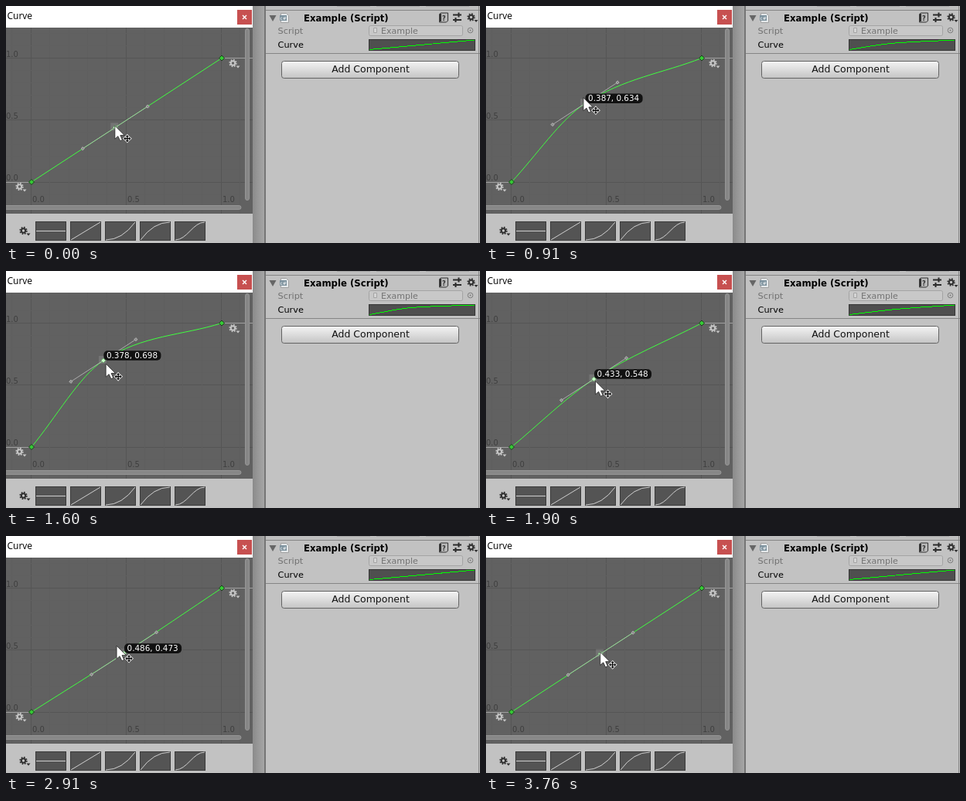
Animation, 613 px wide and 307 px high, one loop 3910 ms. Source, as an HTML page:

```html
<!DOCTYPE html>
<html lang="en">
<head>
<meta charset="utf-8">
<title>Curve editor</title>
<style>
html, body { margin: 0; width: 100%; height: 100%; overflow: hidden; background: #c2c2c2; }
svg { display: block; width: 613px; height: 307px; font: 11px "DejaVu Sans", sans-serif; }
.axis { font-size: 10px; fill: #3f3f3f; }
.line { fill: none; stroke: #40ff40; }
.crisp { shape-rendering: crispEdges; }
</style>
</head>
<body>
<svg viewBox="0 0 613 307">
  <defs>
    <linearGradient id="btn" x2="0" y2="1"><stop stop-color="#f4f4f4"/><stop offset="1" stop-color="#c4c4c4"/></linearGradient>
    <linearGradient id="shade"><stop stop-color="#8b8b8b"/><stop offset="1" stop-color="#a6a6a6"/></linearGradient>
    <g id="gear">
      <circle r="4.3" fill="none" stroke="currentColor" stroke-width="1.8" stroke-dasharray="1.7 1.677"/>
      <circle r="2.7" fill="none" stroke="currentColor" stroke-width="2"/>
      <path d="M4 3.5h5l-2.500 3z" fill="currentColor"/>
    </g>
  </defs>

  <!-- inspector -->
  <rect width="613" height="307" fill="#c2c2c2"/>
  <rect x="319" width="15" height="307" fill="url(#shade)"/>
  <g class="crisp">
    <rect x="334" width="2" height="307" fill="#757575"/>
    <rect x="336" width="277" height="5" fill="#bebebe"/>
    <path d="M428 0.5h43M479 0.5h56M543 0.5h56" stroke="#a5a5a5"/>
    <path d="M336 5.5h277M336 61.5h277" stroke="#858585"/>
    <path d="M611.500 0V307" stroke="#858585"/>
  </g>
  <path d="M340.500 12h9l-4.500 8z" fill="#666"/>
  <path d="M355.500 9.500h7l3 3v9h-10z" fill="#e4e8ea" stroke="#a0a0a0"/>
  <rect x="354" y="12" width="9" height="7" fill="#7d929e"/>
  <text x="354.500" y="18" font-size="6" fill="#fff">c#</text>
  <text x="385" y="20" font-size="11.7" font-weight="bold">Example (Script)</text>
  <path d="M560.500 10.500l2-1.500h9v10l-2 2h-9z" fill="#b8b8b8" stroke="#333"/>
  <path d="M562 10v10" stroke="#333" stroke-width="2"/>
  <text x="564" y="18.500" font-size="8" font-weight="bold" fill="#333">?</text>
  <path d="M578 11.500h11M578 18h11M585.500 8.500v6M581.500 15v6" stroke="#2b2b2b" stroke-width="2"/>
  <use href="#gear" x="601.500" y="14.500" color="#303030"/>
  <text x="351.500" y="36" font-size="11.300" fill="#707070">Script</text>
  <rect x="469.500" y="25.500" width="121" height="13" rx="2" fill="#c8c8c8" stroke="#a4a4a4"/>
  <path d="M475.500 28.500h4v6h-4z" fill="#d4d4d4" stroke="#a4a4a4"/>
  <text x="485" y="36" fill="#737373">Example</text>
  <circle cx="600.500" cy="31.500" r="3.300" fill="none" stroke="#7d7d7d"/>
  <circle cx="600.500" cy="31.500" r="1" fill="#7d7d7d"/>
  <text x="351.500" y="54" font-size="11.300">Curve</text>
  <rect x="469.500" y="43.500" width="137" height="14" fill="#4f4f4f" stroke="#363636"/>
  <path id="mini" class="line crisp" style="stroke: #0f0"/>
  <rect x="356.500" y="71.500" width="229" height="22" rx="3" fill="url(#btn)" stroke="#636363"/>
  <text x="471.500" y="86" font-size="12.500" text-anchor="middle" fill="#111">Add Component</text>

  <!-- curve window -->
  <rect width="319" height="28" fill="#fff"/>
  <text x="1.500" y="17" style="font: 12px 'Open Sans', sans-serif">Curve</text>
  <rect x="299" y="5" width="19" height="19" fill="#c75050"/>
  <path d="M306 12l5 5M311 12l-5 5" stroke="#fff" stroke-width="1.400"/>
  <rect y="28" width="319" height="241" fill="#616161"/>
  <g id="grid" class="crisp"></g>
  <path class="crisp" d="M0 228.500H33M279 67.500H319" stroke="#a0a0a0"/>
  <g fill="#878787" stroke="#969696">
    <rect x="309.500" y="29.500" width="5" height="222" rx="2.500"/>
    <rect x="-4" y="258.500" width="308" height="5" rx="2.500"/>
  </g>
  <use href="#gear" x="17.500" y="234" color="#c6c6c6"/>
  <use href="#gear" x="293.500" y="74" color="#c6c6c6"/>
  <rect y="269" width="319" height="38" fill="#c2c2c2"/>
  <use href="#gear" x="22.500" y="291" color="#303030"/>
  <g id="presets"></g>

  <path id="curve" class="line"/>
  <path d="M33 224.500l3.500 3.500-3.500 3.500-3.500-3.500zM279 64l3.500 3.500-3.500 3.500-3.500-3.500z" fill="#35c835" stroke="#1d3a1d"/>
  <g id="key">
    <rect x="-6" y="-6" width="10" height="10" fill="#fff" opacity=".12"/>
    <path d="M-42 27.300L42-27.300" stroke="#b4b4b4" stroke-width=".9"/>
    <path d="M-42 25.200l2.100 2.100-2.100 2.100-2.100-2.100zM42-29.400l2.100 2.100-2.100 2.100-2.100-2.100z" fill="#8c8c8c" stroke="#c4c4c4" stroke-width=".8"/>
    <path d="M0-3l3 3-3 3-3-3z" fill="#c8ffc8" stroke="#5a9a5a" stroke-width=".7"/>
    <g id="tip">
      <rect x=".5" y="-12.800" width="74" height="12.600" rx="5" fill="#111"/>
      <text id="value" x="4" y="-2.800" font-size="10.400" fill="#fff"></text>
    </g>
  </g>
  <g id="cursor">
    <path d="M0 0V17L4 13.500 6.800 19.500 9.600 18.200 7 12.300H12.300z" fill="#fff" stroke="#222" stroke-width=".8"/>
    <path transform="translate(16 16.500)" d="M0-4.800l2.200 2.500H.7v1.600h1.600v-1.500L4.800 0 2.300 2.200V.7H.7v1.600h1.500L0 4.800-2.200 2.300h1.500V.7h-1.600v1.500L-4.800 0l2.500-2.200v1.500h1.600v-1.600h-1.500z" fill="#111" stroke="#fff" stroke-width="1.500" paint-order="stroke"/>
  </g>
</svg>
<script>
const $ = id => document.getElementById(id);
const LOOP = 3910;

// The dragged key: time, x, y
const drag = [
  [0, .44, .44], [125, .44, .44], [590, .409, .529], [670, .407, .537],
  [1200, .36, .76], [1290, .35, .773], [1450, .35, .773],
  [1900, .433, .548], [1980, .443, .517], [2440, .575, .323], [2600, .575, .323],
  [2910, .486, .473], [2990, .449, .521], [3070, .434, .545], [3220, .434, .545],
  [3530, .468, .47], [LOOP, .468, .47]
];

// Redraw times, as runs of even steps: first, last, count
const steps = [0];
for (const [a, b, n] of [[190, 670, 7], [750, 1200, 7], [1290, 1290, 1], [1520, 1980, 7],
                         [2070, 2440, 6], [2670, 3070, 6], [3300, 3530, 4]])
  for (let i = 0; i < n; i++)
    steps.push(Math.round((a + (b - a) * i / Math.max(1, n - 1)) / 10) * 10);

function keyAt(t) {
  const i = drag.findIndex(p => p[0] > t);
  if (i < 0) return drag[drag.length - 1].slice(1);
  const [t0, x0, y0] = drag[i - 1], [t1, x1, y1] = drag[i];
  const u = (t - t0) / (t1 - t0);
  return [x0 + (x1 - x0) * u, y0 + (y1 - y0) * u];
}

const view = (left, bottom, w, h) => (x, y) => [left + x * w, bottom - y * h];
const graph = view(33, 228, 246, 160.5);
const thumb = view(470, 56.5, 136, 12.5);

// Cubic through (0,0), the key and (1,1): slope 1 at the key, chord slopes at the ends
function curvePath(x, y, map) {
  const a = x / 3, b = (1 - x) / 3;
  const pts = [[a, y / 3], [x - a, y - a], [x, y], [x + b, y + b], [1 - b, 1 - (1 - y) / 3], [1, 1]];
  return `M${map(0, 0)}C` + pts.map(p => map(...p)).join(" ");
}

function drawStatic() {
  let grid = "", labels = "";
  for (let i = -1; i <= 12; i++) {
    const [x, y] = graph(i / 10, i / 10).map(Math.floor);
    const major = i % 5 === 0;
    if (x < 319) grid += `<path d="M${x - .5} 28V269" stroke="${major ? "#555" : "#5e5e5e"}"/>`;
    if (y > 28) grid += `<path d="M0 ${y + .5}H319" stroke="${major ? "#555" : "#606060"}"/>`;
  }
  for (const v of [0, .5, 1]) {
    const [x, y] = graph(v, v), s = v.toFixed(1);
    labels += `<text class="axis" x="${x + 1}" y="254">${s}</text>
      <text class="axis" x="0" y="${Math.round(y - 2)}">${s}</text>`;
  }
  $("grid").innerHTML = grid + labels;

  const shapes = ["M1 12.500H39", "M1 24L39 1", "M1 24Q22 24 39 1", "M1 24Q18 1 39 1", "M1 24C16 24 24 1 39 1"];
  $("presets").innerHTML = shapes.map((d, i) => `<g transform="translate(${38 + 45 * i} 279)">
    <rect x=".5" y=".5" width="39" height="24" fill="#545454" stroke="#3a3a3a"/>
    <path d="${d}" fill="none" stroke="#cfcfcf"/></g>`).join("");
}

function draw(t) {
  const step = steps.filter(s => s <= t).pop();
  const [x, y] = keyAt(step);
  const [cx, cy] = graph(...keyAt(step + 80)); // the pointer runs one redraw ahead
  $("curve").setAttribute("d", curvePath(x, y, graph));
  $("mini").setAttribute("d", curvePath(x, y, thumb));
  $("key").setAttribute("transform", `translate(${graph(x, y)})`);
  $("cursor").setAttribute("transform", `translate(${cx - .4} ${cy - 2.2})`);
  $("tip").setAttribute("visibility", t >= 40 && t < 3760 ? "visible" : "hidden");
  $("value").textContent = `${x.toFixed(3)}, ${y.toFixed(3)}`;
}

drawStatic();
const start = performance.now();
function tick() {
  draw((performance.now() - start) % LOOP);
  requestAnimationFrame(tick);
}
tick();
</script>
</body>
</html>
```
